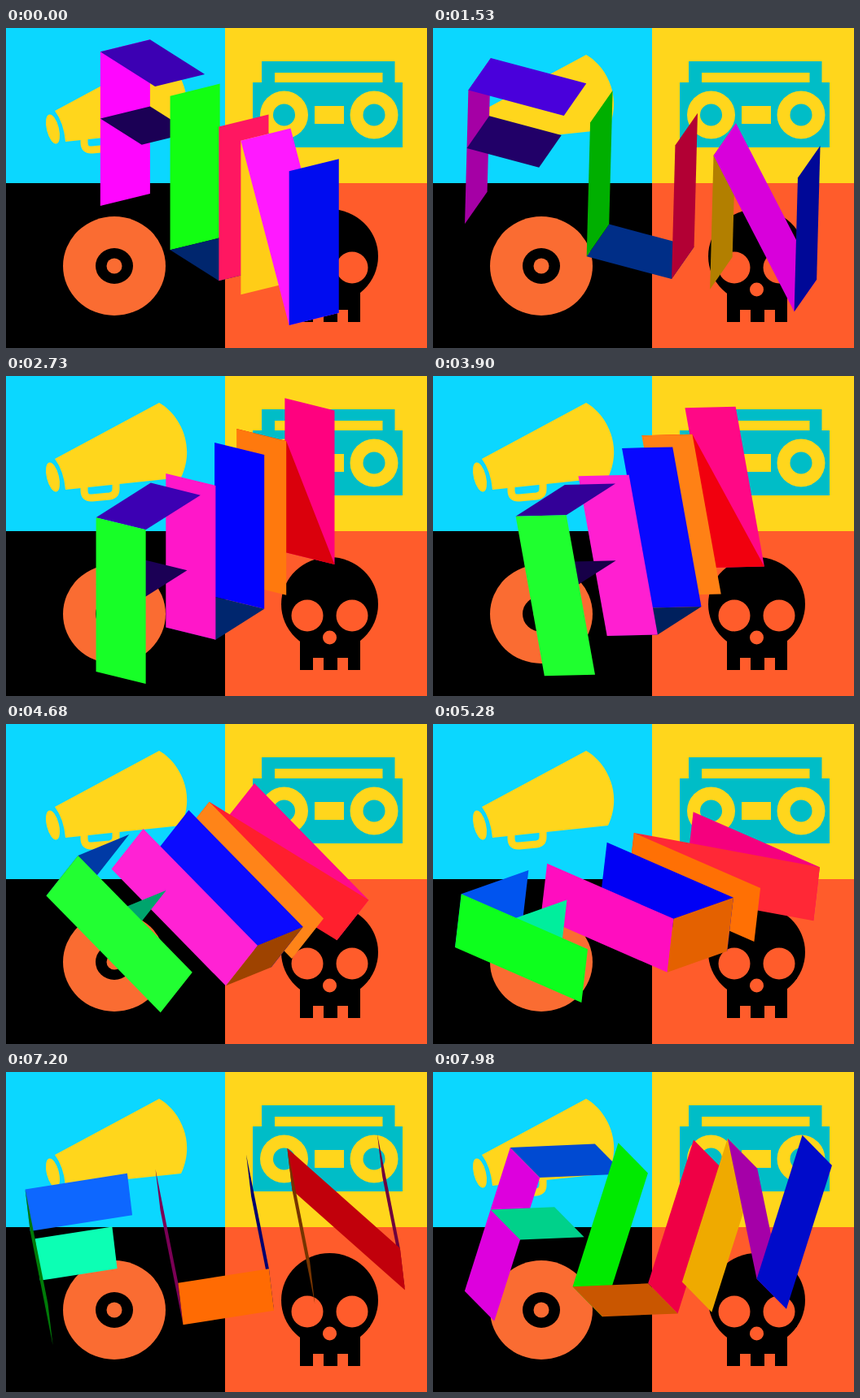
Recreate the animation shown at these times as an HTML page. Size 517 px wide and 394 px high, loop 8 s.

```html
<!DOCTYPE html>
<html lang="en">
<head>
<meta charset="utf-8">
<title>Fun</title>
<style>
html, body { margin: 0; height: 100%; overflow: hidden; }
svg { display: block; width: 517px; height: 394px; }
</style>
</head>
<body>
<svg viewBox="0 0 517 394">
  <path fill="#0bd7ff" d="M0 0H269V191H0z"/>
  <path fill="#ffd61c" d="M269 0H517V191H269z"/>
  <path d="M0 191H269V394H0z"/>
  <path fill="#ff5c2b" d="M269 191H517V394H269z"/>

  <!-- megaphone -->
  <g fill="#ffd61c">
    <ellipse cx="57.5" cy="124.5" rx="7.5" ry="18.5" transform="rotate(-14 57.5 124.5)"/>
    <path d="M60 102L188 33C212 46 234 85 215 125L73 140Q71 117 60 102z"/>
    <path fill="none" stroke="#ffd61c" stroke-width="9" d="M96 136V141Q96 151 106 150L127 148Q135 147 135 139V131"/>
  </g>

  <!-- boombox -->
  <path fill="#00bdc7" d="M303 67H314V41H477.5V67H487V147H303z"/>
  <g fill="#ffd61c">
    <path d="M330 55H462.5V67H330zM379 96H415V118H379z"/>
    <circle cx="341.5" cy="107" r="29.5"/>
    <circle cx="452" cy="107" r="29.5"/>
  </g>
  <g fill="#00bdc7">
    <circle cx="341.5" cy="107" r="13.5"/>
    <circle cx="452" cy="107" r="13.5"/>
  </g>

  <!-- record -->
  <g fill="#fa6c32">
    <ellipse cx="133" cy="293" rx="63" ry="61"/>
    <ellipse cx="133" cy="293" rx="23" ry="22" fill="#000"/>
    <circle cx="133" cy="293" r="9.5"/>
  </g>

  <!-- skull -->
  <ellipse cx="397.5" cy="281" rx="59.5" ry="58"/>
  <path d="M361 315H435V362H420V347H407V362H390V347H377V362H361z"/>
  <g fill="#ff5c2b">
    <circle cx="370" cy="295" r="19.5"/>
    <circle cx="425" cy="295" r="19.5"/>
    <circle cx="397.5" cy="322" r="8.5"/>
  </g>

  <g id="word"></g>
</svg>
<script>
const LOOP = 8000, STEP = 30, TURN = 1800;
const H = 206.5, DEPTH = 72, MID = 89.5;
const PIVOT = [231, 131, 27];

// a ribbon runs from one point to another and has a colour on each side
const ribbon = (x1, y1, x2, y2, ...sides) => ({
  x1, y1, x2, y2,
  sides: sides.map(hex => hex.match(/../g).map(h => parseInt(h, 16)))
});
const stem = (x, ...sides) => ribbon(x, 0, x, H, ...sides);
const bar = (x, y, width, ...sides) => ribbon(x + width, y, x, y, ...sides);

const ribbons = [
  // F
  stem(0, "00ff10", "ec00ec"),
  bar(0, 0, 127, "4c00e4", "005aff"),
  bar(0, MID, 96, "22006c", "00fea8"),
  // U
  stem(162, "ff00b2", "00fa00"),
  bar(162, H, 113, "00308c", "f46800"),
  stem(275, "0000e6", "ff004a"),
  // N
  stem(326, "f46c00", "ffb600"),
  ribbon(326, 0, 438, H, "fa000e", "ec00f0"),
  stem(438, "e6007e", "000cd8")
];

// resting views: when the turn away begins, pivot on screen, gaze, downward axis
const views = [
  { leave: 930, at: [261, 221.5], gaze: [-.779, .395, .486], down: [.335, .919, -.209] },
  { leave: 3660, at: [271, 226.5], gaze: [.779, .395, .486], down: [-.335, .919, -.209] },
  { leave: 6360, at: [281.7, 223.5], gaze: [.667, -.66, .348], down: [-.252, .252, .934] },
  { leave: LOOP, at: [260, 209.7], gaze: [-.683, -.337, .642], down: [-.006, .897, .442] }
];

const dot = (a, b) => a.reduce((sum, v, i) => sum + v * b[i], 0);
const blend = (a, b, u, v) => a.map((n, i) => n * u + b[i] * v);
const unit = a => a.map(n => n / Math.hypot(...a));
const cross = ([a, b, c], [x, y, z]) => [b * z - c * y, c * x - a * z, a * y - b * x];

function slerp(a, b, p) {
  const angle = Math.acos(dot(unit(a), unit(b)));
  return unit(blend(a, b, Math.sin((1 - p) * angle), Math.sin(p * angle)));
}

function camera(t) {
  const i = Math.max(0, views.findLastIndex(v => v.leave <= t));
  const a = views[i], b = views[i + 1];
  const p = Math.min(1, Math.max(0, (t - a.leave) / TURN));
  const gaze = slerp(a.gaze, b.gaze, p);
  const hint = slerp(a.down, b.down, p);
  const down = unit(blend(hint, gaze, 1, -dot(hint, gaze)));
  return { at: blend(a.at, b.at, 1 - p, p), right: cross(down, gaze), down, gaze };
}

// the strongest channel burns out and spills into the others
function shade(colour, facing) {
  const k = .45 + .85 * facing;
  const peak = Math.max(...colour);
  const spill = Math.max(0, peak * k - 255) * .8;
  const lit = colour.map(c => c === peak ? c * k : c * Math.min(1, k) + spill);
  return `rgb(${lit.map(c => Math.min(255, Math.round(c)))})`;
}

const word = document.getElementById("word");
const faces = ribbons.map(() => word.appendChild(
  document.createElementNS("http://www.w3.org/2000/svg", "polygon")));

function draw(t) {
  const { at, right, down, gaze } = camera(t);
  const project = (...v) => {
    const p = blend(v, PIVOT, 1, -1);
    return [at[0] + dot(right, p), at[1] + dot(down, p)];
  };
  // sort far to near, measured where the F's arm meets its stem
  const far = ({ x1, y1, x2, y2 }) => dot(gaze, [
    x1 + (x2 - x1) * MID / H, y1 + (y2 - y1) * MID / H, 0]);

  [...ribbons].sort((a, b) => far(b) - far(a)).forEach((r, i) => {
    const { x1, y1, x2, y2, sides } = r;
    const normal = unit([y2 - y1, x1 - x2, 0]);
    const facing = dot(gaze, normal);
    faces[i].setAttribute("points", [
      project(x1, y1, 0), project(x2, y2, 0),
      project(x2, y2, DEPTH), project(x1, y1, DEPTH)
    ].join(" "));
    faces[i].setAttribute("fill", shade(sides[facing > 0 ? 0 : 1], Math.abs(facing)));
  });
}

function tick() {
  const t = performance.now() % LOOP;
  draw(Math.floor(t / STEP) * STEP);
  requestAnimationFrame(tick);
}
tick();
</script>
</body>
</html>
```
